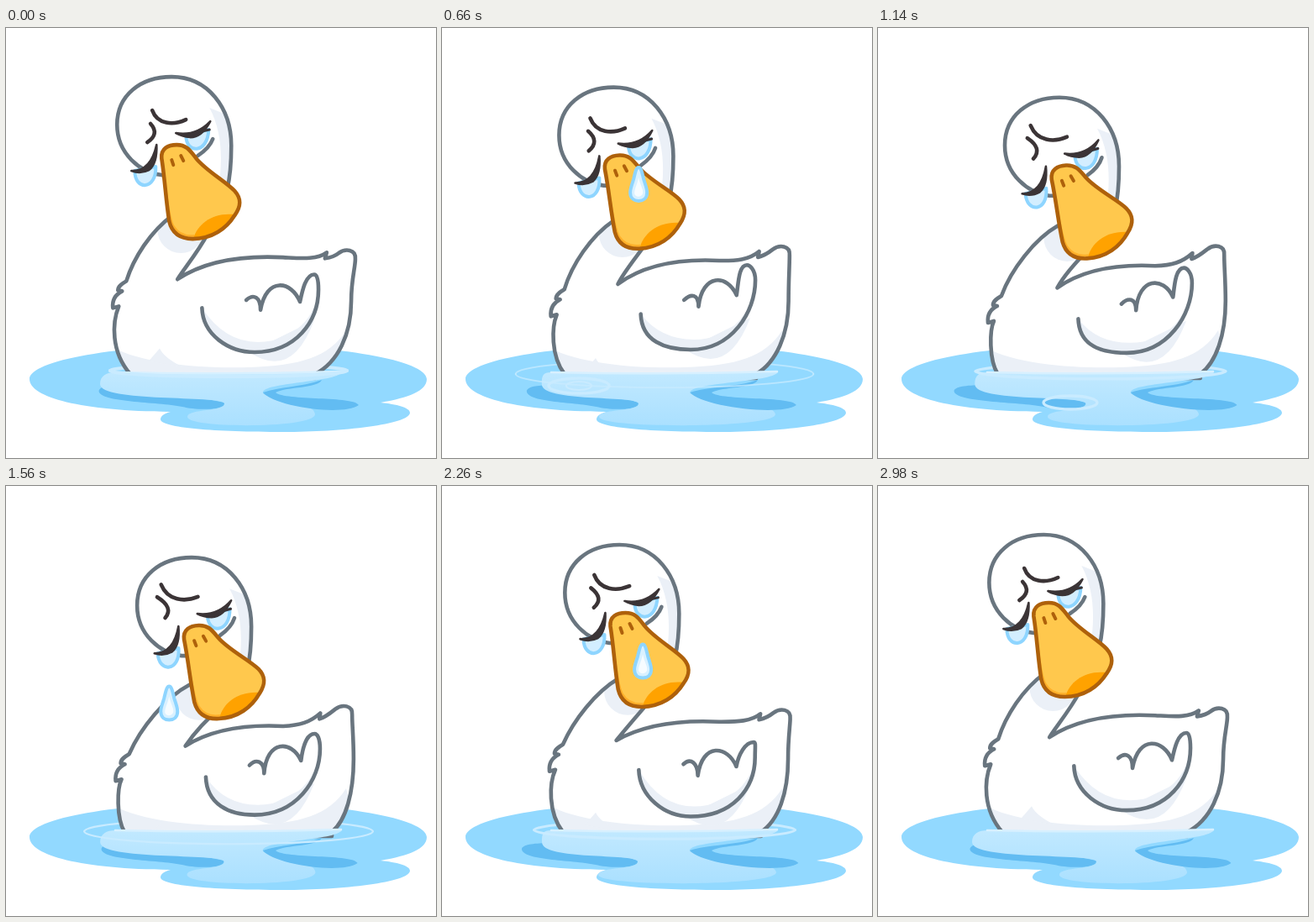
These frames come from a looping animation (512 by 512 pixels, 3000 ms). An HTML page with a canvas:

```html
<!DOCTYPE html>
<html lang="en">
<head>
<meta charset="utf-8">
<title>Crying duck</title>
<style>
html, body { margin: 0; width: 100%; height: 100%; overflow: hidden; background: #fff; }
canvas { display: block; width: 512px; height: 512px; }
</style>
</head>
<body>
<canvas id="stage" width="512" height="512"></canvas>
<script>
const ctx = document.getElementById('stage').getContext('2d');
const LOOP = 3000, TAU = Math.PI * 2;
const GRAY = '#69757f', DARK = '#3b3436', SHADE = '#ebf0f7';
const POOL = '#92d9ff', DEEP = '#62bcf2', TEAR = '#8ed5ff', PALE = '#c9ebff';

// start time, start point, landing point of every tear
const tears = [
  [20, 170, 195, 163, 426],
  [440, 235, 142, 229, 446],
  [1317, 192, 205, 202, 442],
  [1989, 238, 142, 243, 446]
];
const GRAVITY = 0.0009;

ctx.lineCap = ctx.lineJoin = 'round';

function draw(d, fill, stroke, width = 4.6) {
  const path = new Path2D(d);
  if (fill) { ctx.fillStyle = fill; ctx.fill(path); }
  if (stroke) { ctx.strokeStyle = stroke; ctx.lineWidth = width; ctx.stroke(path); }
}

// Fill, shade inside the shape, then outline
function shaded(d, fill, shades, stroke) {
  draw(d, fill);
  ctx.save();
  ctx.clip(new Path2D(d));
  for (const [shape, color] of shades) draw(shape, color);
  ctx.restore();
  draw(d, null, stroke);
}

function oval(x, y, rx, ry, fill, stroke, width, from = 0, to = TAU) {
  ctx.beginPath();
  ctx.ellipse(x, y, rx, ry, 0, from, to);
  if (fill) { ctx.fillStyle = fill; ctx.fill(); }
  if (stroke) { ctx.strokeStyle = stroke; ctx.lineWidth = width; ctx.stroke(); }
}

function bodyRing(t, from, to) {
  const age = t % 1000;
  if (age > 850) return;
  const k = age / 1000;
  ctx.globalAlpha = Math.min(1, (850 - age) / 250);
  oval(265, 408 + 6 * k, 141 + 55 * k, 7 + 14 * k, null, PALE, 4 - 3.4 * k, from, to);
  ctx.globalAlpha = 1;
}

function body(hx, hy, s, p, r, tail) {
  const tx = -4 * s, fold = 11 * s, back = 13 * p;
  const d = `M${198 + .8 * hx} ${223 + .5 * hy}
    C${172 + 18 * p} ${242 + 10 * s} ${152 + 8 * p} ${273 + 16 * s} ${143 + 4 * r} ${301 + 19 * s}
    c-5 3-10 6-10 11l5 1c-8 4-12 11-11 20l7-2
    C${126 + 7 * r} ${350 + 10 * s} ${124 + 8 * r} ${385 + 10 * s} ${148 - 7 * p} 412
    V417H${368 + 20 * p}V412
    C${395 + 10 * p} 398 ${411 + 3 * s} 365 ${411 + 3 * s} 325
    C${411 + 3 * s} 300 ${416 + tx} 285 ${416 + tx} ${275 + tail}
    C${417 + tx} ${263 + tail} ${404 + tx} ${262 + tail} ${396 + tx} ${268 + tail}
    C${391 + tx} ${272 + tail} ${386 - 6 * s} ${273 + tail + 5 * s} ${380 - 7 * s} ${274 + tail + 6 * s}
    L${382 - 8 * s} ${267 + tail + 6 * s}
    C${370 - 8 * s} ${276 + tail + 8 * s} 350 ${274 + .85 * back} 330 ${273 + back}
    C290 ${271 + back} ${240 + 8 * s} ${275 + back} ${204 + 10 * s} ${299 + fold}
    C${213 + 10 * p} ${285 + fold} ${228 + 10 * p} ${267 + 12 * s} ${240 + .7 * hx} ${245 + .6 * hy}Z`;
  const nx = 208 + .85 * hx, ny = 240 + .4 * hy;
  shaded(d, '#fff', [
    ['M120 375C150 399 230 406 290 404C350 402 385 392 405 360L420 420H120Z', SHADE],
    [`M183 ${381 + 22 * s}q5 11 27 22l-40-7Z`, SHADE],
    [`M${nx - 28} ${ny}a28 28 0 1 0 56 0a28 28 0 1 0-56 0Z`, SHADE]
  ], GRAY);
}

function wing(s, r, wave) {
  const sx = 233 + 5.5 * r, sy = 333 + 14 * s, dx = 4.5 * s;
  const by = 388.5 - 5.7 * wave(220);
  const tipX = 367 - 4 * wave(0), tipY = 294.5 - 11.5 * wave(0);
  const n1 = 326 - 8 * wave(0), n2 = 338.5 - 7 * wave(200), end = 328 - 5.3 * wave(420);
  const right = 372 + 2 * s, nx = 303 + dx;
  const under = `M${sx} ${sy}C${sx + 1} ${sy + 32} 265 ${by} 296 ${by}
    C345 ${by} ${right} ${tipY + 55} ${right} ${tipY + 17}`;
  draw(`M290 ${by}Q340 ${by + 34} 367 ${by - 38}Z`, SHADE);
  draw(under + `C${right - 2} ${by - 45} 345 ${by - 12} 300 ${by - 12}Q260 ${by - 12} ${sx} ${sy}Z`, SHADE);
  draw(under + `C${right} ${tipY + 4} ${tipX + 3} ${tipY - 1} ${tipX} ${tipY - 1}
    C${tipX - 10} ${tipY - 1} 353 ${n1 - 14} ${350 + .3 * dx} ${n1}
    C340 ${n1 - 25} 310 ${n2 - 40} ${nx} ${n2}
    C${nx} ${n2 - 15} ${295 + .6 * dx} ${end - 8} ${286 + .9 * dx} ${end}`, null, GRAY);
}

function head(hx, hy, tilt) {
  const skull = `M200 175L185 175C160 172 132 150 132 115C132 80 160 58 197 58
    C240 58 268 95 268 140C268 160 266 180 263 192`;
  ctx.save();
  ctx.translate(.93 * hx, hy);
  shaded(skull, '#fff', [['M242 95C258 125 258 160 252 195H280V110Z', SHADE]], GRAY);
  ctx.restore();

  // The face leans while the skull only shifts
  ctx.save();
  ctx.translate(200 + hx, 130 + hy);
  ctx.rotate(tilt);
  ctx.translate(-200, -130);
  draw('M246 132Q242 143 228 152', null, GRAY);

  draw('M214 128C214 150 240 150 241 121Z', '#d3eeff', TEAR, 4);
  draw('M153 170C153 194 179 193 178 165Z', '#d3eeff', TEAR, 4);

  // Lashes
  draw('M202 125Q226 129 243 111Q233 130 219 130Q209 129 202 125Z', DARK, DARK, 2.6);
  draw('M233 123L242 121', null, DARK, 3);
  draw('M149 170Q172 171 179 139Q180 161 170 169Q160 174 149 170Z', DARK, DARK, 2.6);

  // Brows follow the head less than the face does
  const brow = (x, y, kx, ky) => `${x - kx * hx} ${y - ky * hy} `;
  draw('M' + brow(174, 98, .52, .35) + 'C' + brow(180, 115, .48, .25) +
    brow(199, 116, .44, .2) + brow(214, 109, .4, .15), null, DARK, 4.6);
  draw('M' + brow(172, 114, .65, .4) + 'Q' + brow(183, 126, .32, .35) +
    brow(168, 136, .17, .28), null, DARK, 4.6);

  shaded(`M185 155C184 143 193 139 203 139C215 139 219 146 226 155C238 170 262 183 272 194
    C280 203 280 212 272 223C262 239 245 251 222 251C205 251 197 243 194 230C190 205 189 180 185 155Z`,
    '#ffc84d', [
      ['M186 155C191 180 193 220 200 235Q208 248 224 246L222 256H190Z', '#ffb02a'],
      ['M223 250C228 233 246 219 272 222L280 225L240 258Z', '#ffa200']
    ], '#ae610b');
  draw('M197 157L199 163M208 152L211 158', null, '#ae610b', 4);
  ctx.restore();
}

function water(t) {
  const turn = t / 1500 * TAU, w = (1 - Math.cos(turn)) / 2;
  const a = 103 + 15 * Math.cos(turn - 1.05);
  const r = 422 - 6 * Math.cos(turn - 1.22);
  const e = 260 - 27 * w, n = 306 - 11 * w;
  const lowL = 216 - 30 * w, lowR = 368 + 30 * w, lobe = 112 + 7 * w;
  const light = ctx.createLinearGradient(0, 408, 0, 474);
  light.addColorStop(0, '#c2e9ff');
  light.addColorStop(1, '#aae0ff');

  draw(`M${a} 432C${a + 2} 422 150 424 190 432L${e} 446C${e + 2} 456 ${e - 35} 455 ${e - 50} 451
    C${e - 80} 445 ${a} 446 ${a} 432Z`, DEEP);
  draw(`M130 410H400C392 422 ${n} 422 ${n} 434C${n} 442 ${lowR} 444 ${lowR} 460
    C${lowR} 477 ${lowL} 477 ${lowL} 463C${lowL} 453 ${e + 2} 457 ${e} 447
    C${e - 4} 437 ${lobe} 446 ${lobe} 424C${lobe} 414 120 410 130 410Z`, light);
  draw(`M376 419C350 428 ${n + 20} 427 ${n} 434C${n + 12} 450 ${r - 20} 463 ${r} 449
    C${r - 5} 438 332 444 321 434C335 427 372 429 376 419Z`, DEEP);
  draw('M130 410Q265 413 399 409', null, '#d7f0ff', 2.5);
}

function tear([start, x0, y0, x1, y1], t) {
  const age = t - start, fall = Math.sqrt((y1 - y0) / GRAVITY);
  if (age < 0) return;
  if (age < fall) {
    const k = age / fall, size = Math.min(1, .3 + age / 180);
    ctx.save();
    ctx.translate(x0 + (x1 - x0) * k * k, y0 + (y1 - y0) * k * k);
    ctx.scale(size, size);
    draw('M0-20C3-20 4-14 6-6C8 1 10 5 10 10C10 17 5 20 0 20C-5 20-10 17-10 10C-10 5-8 1-6-6C-4-14-3-20 0-20Z', '#d9f1ff', TEAR, 4);
    draw('M0-8C2 2 6 6 5 11C3 16-4 16-5 11C-5 5-2 2 0-8Z', '#f6fcff');
    ctx.restore();
    return;
  }
  const wet = age - fall;
  if (wet > 400) return;
  if (wet < 105) {
    const k = Math.min(1, wet / 70);
    oval(x1, y1, 18 * k, 7 * k, PALE);
    return;
  }
  const rx = 18 + (wet - 70) * .28;
  ctx.globalAlpha = Math.min(1, (400 - wet) / 230);
  oval(x1, y1, rx, rx * .25, null, PALE, 3.4);
  if (wet > 125) oval(x1, y1, rx * .42, rx * .14, null, PALE, 2);
  ctx.globalAlpha = 1;
}

function frame(now) {
  const t = now % LOOP;
  const wave = lead => Math.sin((t + lead) / LOOP * TAU);
  const dip = lead => (1 - Math.cos((t + lead) / LOOP * TAU)) / 2;
  const s = dip(130), p = dip(-100), r = dip(250);
  const hx = 26 * p, hy = 27.5 * dip(50);
  const tilt = .007 - .03 * (1 - Math.cos(t / LOOP * TAU + .7));
  const tail = -3.7 * wave(-200) - 1.3;

  ctx.fillStyle = '#fff';
  ctx.fillRect(0, 0, 512, 512);
  draw(`M28 418C28 396 132 377 264 377C398 377 501 396 501 418C501 432 480 440 446 446
    C465 448 481 452 481 458C481 472 400 481 330 481C250 481 184 476 184 466
    C184 462 188 459 196 457C90 456 28 440 28 418Z`, POOL);
  bodyRing(t, Math.PI, TAU);
  body(hx, hy, s, p, r, tail);
  wing(s, r, wave);
  head(hx, hy, tilt);
  water(t);
  bodyRing(t, 0, Math.PI);
  for (const row of tears) tear(row, t);
}

const begin = performance.now();
function tick() {
  frame(performance.now() - begin);
  requestAnimationFrame(tick);
}
tick();
</script>
</body>
</html>
```
